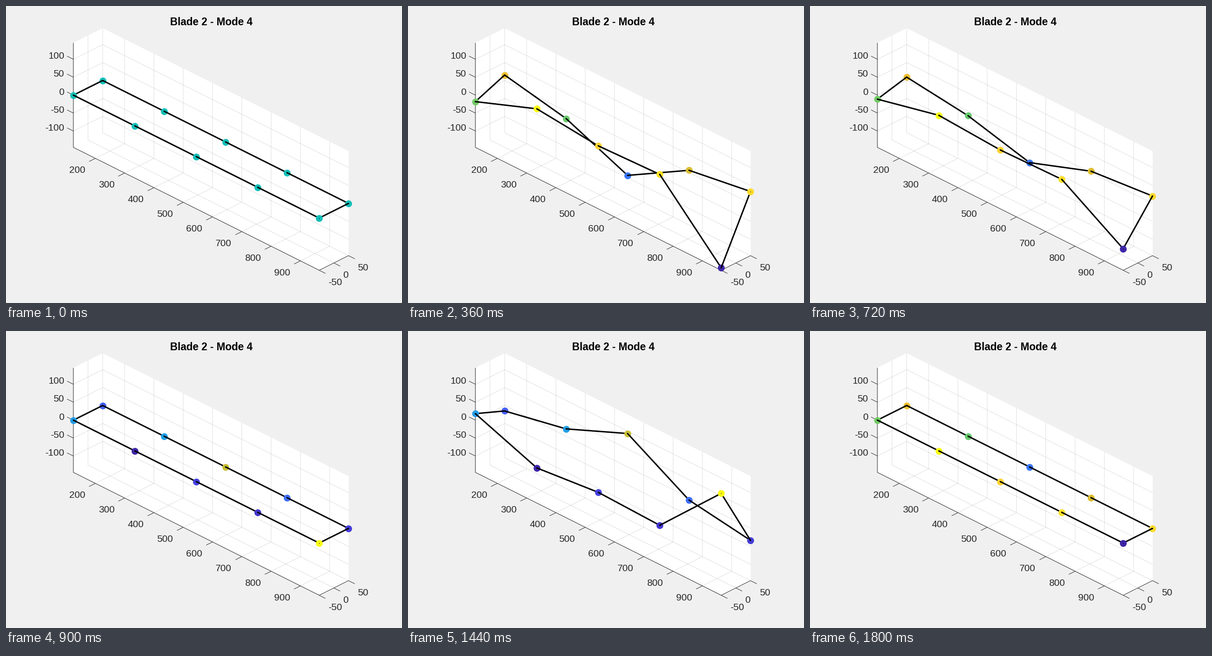
Recreate the animation shown at these times as a matplotlib script. Size 864x648 px, loop 1.89 s.

```python
import numpy as np
import matplotlib.pyplot as plt
from matplotlib.animation import FuncAnimation
from matplotlib.colors import LinearSegmentedColormap

W, H, DPI = 864, 648, 150
PX = 72 / DPI
FRAMES = 21
INK = "#262626"
SCALE = .9037
X0, X1, Y0, Y1, ZMAX = 124.9, 964.2, -50, 50, 145.6
AZ, EL = np.radians([45, 30])

plt.rcParams["font.family"] = "Liberation Sans"
fig = plt.figure(figsize=(W / DPI, H / DPI), dpi=DPI, facecolor="#f0f0f0")
ax = fig.add_axes([0, 0, 1, 1])
ax.set_xlim(0, W)
ax.set_ylim(H, 0)
ax.axis("off")

cmap = LinearSegmentedColormap.from_list("blade", [
    "#3e26a8", "#4743e7", "#4367fd", "#2d8cf3", "#1caadf", "#12beb9",
    "#4acb84", "#9ec942", "#eaba30", "#fccf35", "#f9fb15"])


def project(x, y, z):
    """Orthographic view onto the stage, in pixels."""
    u, v = (x - X0) * np.cos(AZ), (y - Y0) * np.sin(AZ)
    return (147 + SCALE * (u + v),
            194.5 + SCALE * ((u - v) * np.sin(EL) - z * np.cos(EL)))


def depth(p):
    """Closeness to the viewer."""
    return (p[0] * np.cos(AZ) - p[1] * np.sin(AZ)) * np.cos(EL) + p[2] * np.sin(EL)


def line3(*pts, **kw):
    ax.plot(*zip(*(project(*p) for p in pts)), **kw)


def label(point, value, dx, dy, ha):
    x, y = project(*point)
    ax.text(x + dx, y + dy, str(value), ha=ha, va="baseline", size=10, color=INK)


def draw_box():
    lo, hi = -ZMAX, ZMAX
    walls = [
        [(X0, Y0, lo), (X0, Y1, lo), (X0, Y1, hi), (X0, Y0, hi)],
        [(X0, Y1, lo), (X1, Y1, lo), (X1, Y1, hi), (X0, Y1, hi)],
        [(X0, Y0, lo), (X1, Y0, lo), (X1, Y1, lo), (X0, Y1, lo)],
    ]
    for wall in walls:
        ax.fill(*zip(*(project(*p) for p in wall)), color="white", lw=0.3, zorder=1)

    grid = dict(color=INK, alpha=.15, lw=PX, zorder=2)
    edge = dict(color=INK, lw=PX, zorder=3, solid_capstyle="butt")
    tick = 21.5

    for x in range(200, 1000, 100):
        line3((x, Y0, lo), (x, Y1, lo), (x, Y1, hi), **grid)
        line3((x, Y0, lo), (x, Y0 - tick, lo), **edge)
        label((x, Y0, lo), x, -22, 32, "right")
    for y in range(-50, 51, 50):
        line3((X1, y, lo), (X0, y, lo), (X0, y, hi), **grid)
        line3((X1, y, lo), (X1 + tick, y, lo), **edge)
        label((X1, y, lo), y, 20.2, 32, "left")
    for z in range(-100, 101, 50):
        line3((X0, Y0, z), (X0, Y1, z), (X1, Y1, z), **grid)
        line3((X0, Y0, z), (X0 - tick, Y0, z), **edge)
        label((X0, Y0, z), z, -20, -1, "right")

    line3((X0, Y0, hi), (X0, Y0, lo), (X1, Y0, lo), (X1, Y1, lo), **edge)
    ax.text(447.5, 42, "Blade 2 - Mode 4", ha="center", va="baseline",
            size=11, weight="bold", color="black")


draw_box()

# Closed outline: out along the near edge, back along the far one
span = np.linspace(X0, X1, 5)
xs = np.r_[span, span[::-1]]
ys = np.repeat([Y0, Y1], 5)
near = [-19, 50, 31.5, 38, -ZMAX]
far = [16, -21.5, -98, 7, 35]
shape = np.r_[near, far[::-1]]
level = (shape - shape.min()) / np.ptp(shape)
N = len(shape)


def artists(count, fmt, **kw):
    return [ax.plot([], [], fmt, **kw)[0] for _ in range(count)]


halves = artists(2 * N, "k-", lw=3.1 * PX, solid_capstyle="round")
dots = artists(N, "o", ms=15 * PX, mew=0)
cores = artists(N, "ko", ms=1.6 * PX, mew=0)


def place(art, pts, z):
    art.set_data(*zip(*(project(*p) for p in pts)))
    art.set_zorder(1000 + z)


def update(k):
    pts = np.column_stack([xs, ys, shape * np.sin(2 * np.pi * k / 20)])
    if k == 0:
        tone = np.full(N, .5)
    else:
        tone = level if k < 10 or k == 20 else 1 - level

    for i, p in enumerate(pts):
        place(dots[i], [p], depth(p))
        place(cores[i], [p], depth(p) + .01)
        dots[i].set_color(cmap(tone[i]))

        # Half segments sort before or behind the marker they touch
        for j, q in enumerate((pts[i - 1], pts[(i + 1) % N])):
            mid = (p + q) / 2
            place(halves[2 * i + j], [p, mid], depth((p + mid) / 2))
    return halves + dots + cores


anim = FuncAnimation(fig, update, frames=FRAMES, interval=90,
                     repeat=True, repeat_delay=0, blit=False)
plt.show()
```
